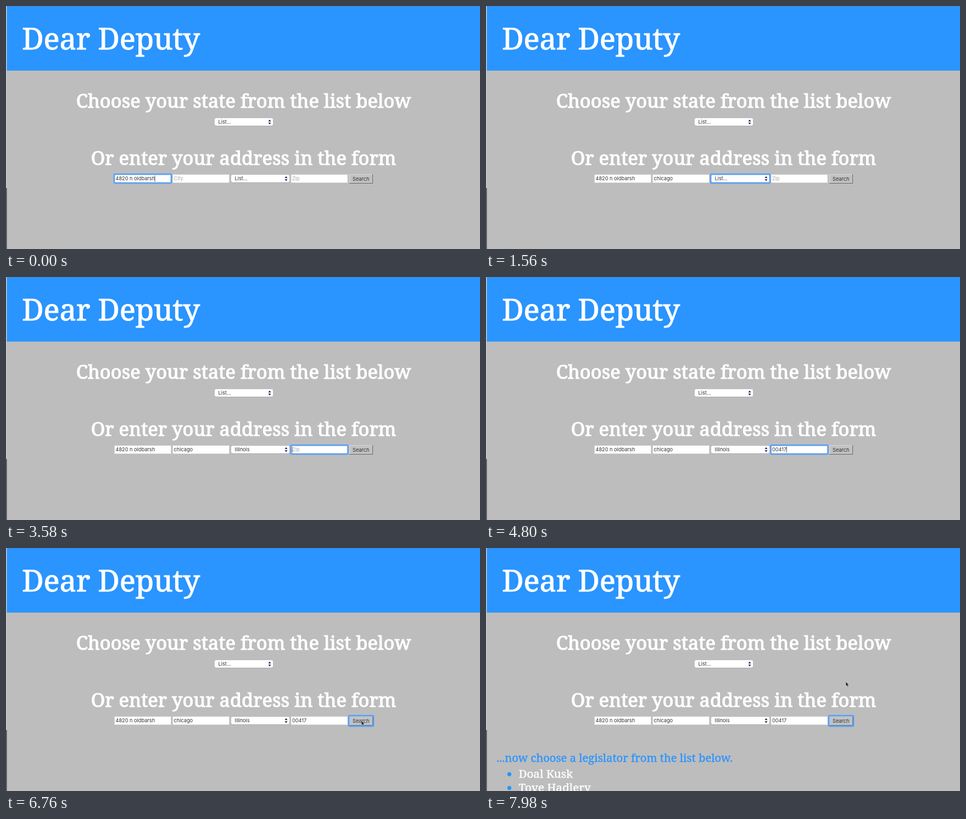
Write an HTML page that moves like this. It is 863 px wide and 442 px high and loops after 8 s.

```html
<!DOCTYPE html>
<html lang="en">
<head>
<meta charset="utf-8">
<title>Dear Deputy</title>
<style>
  html, body { margin: 0; width: 100%; height: 100%; overflow: hidden; background: #bdbdbd; }
  svg { display: block; width: 863px; height: 442px; }
  text { white-space: pre; }
  .slab { font-family: "Noto Serif", serif; fill: #fff; stroke: #fff; stroke-linejoin: round; }
  .title { font-size: 54.5px; letter-spacing: -.2px; stroke-width: 1px; }
  .heading { font-size: 34.5px; stroke-width: 1.2px; text-anchor: middle; }
  .item { font-size: 20.6px; stroke-width: .4px; }
  .prompt { font-size: 20.2px; stroke-width: .4px; fill: #2a94ff; stroke: #2a94ff; }
  .ui { font-family: Inter, sans-serif; font-size: 9.2px; fill: #333; }
  .field { fill: #fff; stroke: #d2d2d2; }
  .ring { fill: none; stroke: #5a9ff5; stroke-width: 2; }
  .glow { fill: none; stroke: #5a9ff5; stroke-width: 3.6; opacity: .5; }
</style>
</head>
<body>
<svg viewBox="0 0 863 442">
  <defs>
    <rect id="box" class="field" x=".5" y=".5" width="103" height="15"/>
    <g id="select">
      <rect y=".8" width="106" height="14" rx="3" fill="#a6a6a6"/>
      <rect width="106" height="13.7" rx="3" fill="#fff"/>
      <path d="M97.5 6L100 2.6L102.5 6ZM97.5 8L100 11.4L102.5 8Z" fill="#1c2f55"/>
    </g>
  </defs>

  <rect width="863" height="442" fill="#bdbdbd"/>
  <rect width="863" height="117.5" fill="#2a94ff"/>
  <rect width="863" height="1" fill="#3f88d2"/>
  <rect width="1.5" height="331" fill="#c6c9cc"/>
  <rect y="331" width="1.5" height="111" fill="#4b4b4b"/>

  <text class="slab title" x="29" y="79">Dear Deputy</text>
  <text class="slab heading" x="432.5" y="184.5">Choose your state from the list below</text>
  <text class="slab heading" x="432.5" y="288.5">Or enter your address in the form</text>

  <use href="#select" x="380" y="204"/>
  <text class="ui" x="386.5" y="214">List...</text>

  <use href="#box" x="197" y="306"/>
  <use href="#box" x="303" y="306"/>
  <use href="#select" x="410" y="307"/>
  <use href="#box" x="518.5" y="306"/>
  <rect x="625" y="306" width="43" height="17" fill="#c2c2c2"/>
  <path d="M625.5 322V306.5H667" fill="none" stroke="#d8d8d8"/>
  <path d="M625 322.5H667.5V306" fill="none" stroke="#666"/>
  <rect id="glow" class="glow" rx="2"/>
  <rect id="ring" class="ring" rx="1.5"/>

  <text class="ui" x="199.5" y="317.3">4820 n oldbarsh</text>
  <text class="ui" id="city" x="305.5" y="317.3"></text>
  <text class="ui" id="state" x="416.5" y="317.3"></text>
  <text class="ui" id="zip" x="521" y="317.3"></text>
  <text class="ui" x="631" y="317.8">Search</text>
  <rect id="caret" y="308.5" width="1" height="11" fill="#556"/>

  <g id="results">
    <text class="slab prompt" x="19" y="388.5">...now choose a legislator from the list below.</text>
    <circle cx="42.5" cy="411.5" r="3.7" fill="#2a94ff"/>
    <text class="slab item" x="59.5" y="417.5">Doal Kusk</text>
    <circle cx="42.5" cy="436.5" r="3.7" fill="#2a94ff"/>
    <text class="slab item" x="59.5" y="442.5">Tove Hadlery</text>
  </g>

  <path id="pointer" d="M0 0V8.5L2 6.8L3.4 10L5 9.3L3.6 6.2H6.2Z" fill="#1d2b45" stroke="#e4e4e4" stroke-width=".6"/>
</svg>
<script>
const LOOP = 8000;
const $ = id => document.getElementById(id);

const typed = {
  city: { text: "chicago", hint: "City", start: 560, step: 105 },
  zip: { text: "00417", hint: "Zip", start: 3810, step: 160 }
};

// Focus stops: start time, ring box, and the editable text with its caret.
const stops = [
  { at: 0, box: [197, 306, 104, 16], caret: 270.5 },
  { at: 320, box: [303, 306, 104, 16], field: "city" },
  { at: 1420, box: [409, 306, 108, 16] },
  { at: 3400, box: [518.5, 306, 104, 16], field: "zip" },
  { at: 6480, box: [624, 305, 45, 19] }
];

const path = [
  [5450, 668, 366], [5800, 646, 325], [6150, 646, 325], [6350, 647, 314],
  [6750, 647, 314], [7250, 655, 252], [7550, 655, 252], [7850, 655, 243]
];

function count({ text, start, step }, t) {
  return Math.max(0, Math.min(text.length, Math.floor((t - start) / step) + 1));
}

function pointerAt(t) {
  const next = path.findIndex(p => p[0] > t);
  if (next < 0) return path[path.length - 1].slice(1);
  const [t0, x0, y0] = path[next - 1], [t1, x1, y1] = path[next];
  const u = (t - t0) / (t1 - t0), k = u * u * (3 - 2 * u);
  return [x0 + (x1 - x0) * k, y0 + (y1 - y0) * k];
}

function show(id, on) {
  $(id).style.display = on ? "" : "none";
}

function drawField(id, t) {
  const n = count(typed[id], t), el = $(id);
  el.textContent = n ? typed[id].text.slice(0, n) : typed[id].hint;
  el.style.fill = n ? "#333" : "#aaa";
}

function drawFocus(t) {
  const stop = stops.filter(s => s.at <= t).pop();
  const [x, y, width, height] = stop.box;
  for (const [key, value] of Object.entries({ x, y, width, height })) {
    $("ring").setAttribute(key, value);
    $("glow").setAttribute(key, value);
  }

  let since = stop.at, caretX = stop.caret;
  if (stop.field) {
    const field = typed[stop.field], n = count(field, t), el = $(stop.field);
    if (n) since = field.start + (n - 1) * field.step;
    caretX = +el.getAttribute("x") - .5 + (n ? el.getComputedTextLength() : 0);
  }
  show("caret", caretX !== undefined && (t - since) % 1000 < 500);
  if (caretX !== undefined) $("caret").setAttribute("x", caretX);
}

function draw(t) {
  drawField("city", t);
  drawField("zip", t);
  $("state").textContent = t < 2300 ? "List..." : "Illinois";
  drawFocus(t);
  show("results", t >= 7760);
  show("pointer", t >= path[0][0]);
  if (t >= path[0][0]) $("pointer").setAttribute("transform", `translate(${pointerAt(t)})`);
}

const began = performance.now();
function tick() {
  draw((performance.now() - began) % LOOP);
  requestAnimationFrame(tick);
}
tick();
</script>
</body>
</html>
```
